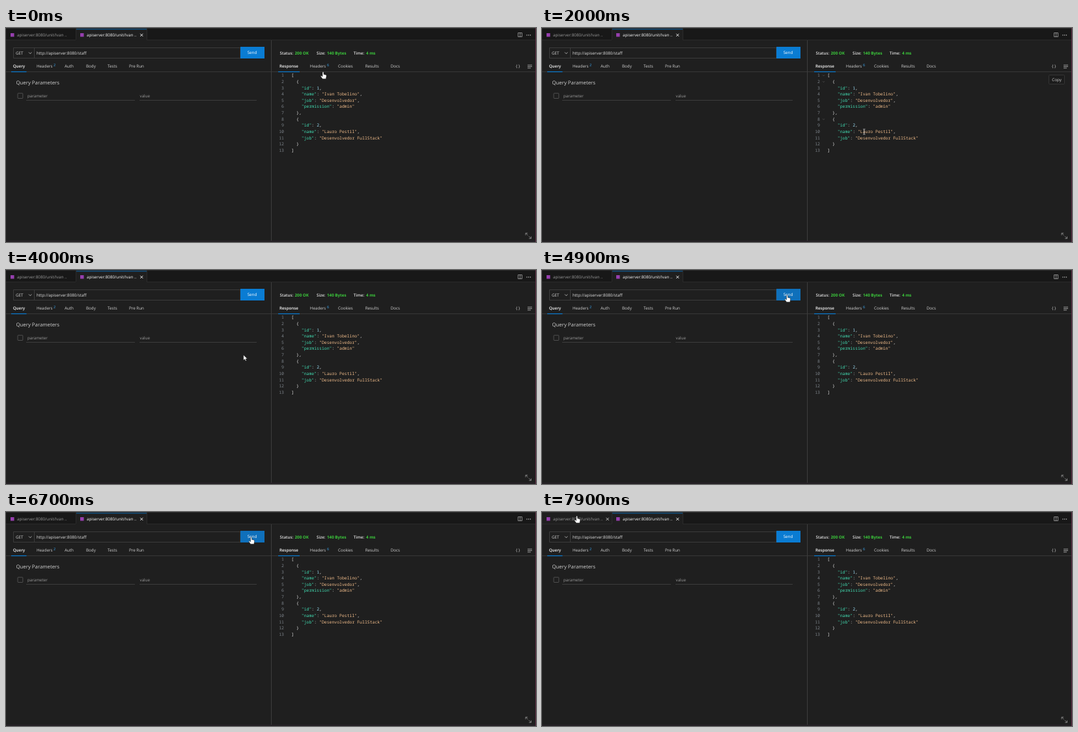
Animation, 814 px wide and 330 px high, one loop 8000 ms. Source, as an HTML page:

```html
<!DOCTYPE html>
<html lang="en">
<head>
<meta charset="utf-8">
<title>API client</title>
<style>
  html, body { margin: 0; width: 100%; height: 100%; overflow: hidden; background: #1f1f1f; }
  svg { display: block; width: 100vw; height: 100vh; }
  text { font: 500 6.25px "Open Sans", "Noto Sans", sans-serif; text-rendering: geometricPrecision; white-space: pre; }
  .code { font: 500 6.48px "Noto Sans Mono", "DejaVu Sans Mono", monospace; }
  .bold { font-weight: 600; }
  .heavy { font-weight: 700; }
  .sup { font-size: 5.5px; }
  .title { font-size: 7.8px; font-weight: 400; }
</style>
</head>
<body>
<svg id="stage" viewBox="0 0 814 330"></svg>
<script>
const LOOP = 8000, STEP = 100;
const C = {
  bg: '#1f1f1f', bar: '#181818', edge: '#2b2b2b', rule: '#444', text: '#d2d2d2', dim: '#9a9a9a',
  white: '#fafafa', blue: '#0a7cd3', hover: '#0f70bb', sky: '#3aa8f4', green: '#3ccb3c',
  key: '#42dcb2', str: '#f0bc8a', num: '#9bdcf5', line: '#7d838a', badge: '#963fae'
};

const rect = (x, y, w, h, fill, extra = '') =>
  `<rect x="${x}" y="${y}" width="${w}" height="${h}" fill="${fill}" ${extra}/>`;
const path = (d, stroke, w = 1, extra = '') =>
  `<path d="${d}" fill="none" stroke="${stroke}" stroke-width="${w}" ${extra}/>`;
const label = (x, y, s, fill = C.text, cls = '', extra = '') =>
  `<text x="${x}" y="${y}" fill="${fill}" class="${cls}" ${extra}>${s}</text>`;
const cross = (x, color, id = '') =>
  path(`M${x - 2} 8.8l4.2 4.2m0-4.2l-4.2 4.2`, color, 0.9, id);

function frame() {
  const tab = 'apiserver:8080/unit/Ivan ..';
  return rect(0, 0, 814, 330, C.bg) +
    rect(0, 0, 814, 19, C.bar) + path('M0 .5H814M0 18.5H814', C.edge) +
    rect(0, 1, 107, 17, C.bg, 'id="tabHover"') +
    rect(107, 1, 109, 18, C.bg) + rect(107, 1.4, 109, 1, '#0c66aa') +
    path('M107.5 1V18M216.5 1V18', C.edge) +
    rect(7, 8, 5.5, 5.5, C.badge) + rect(114, 8, 5.5, 5.5, C.badge) +
    label(17, 13.2, tab, C.dim) + label(124, 13.2, tab, C.white) +
    cross(100.5, C.text, 'id="tabClose"') + cross(208.2, C.white) +
    path('M786.5 7.5h6v6h-6zM789.5 7.5v6', '#b8b8b8', 0.7) +
    [800, 802.7, 805.4].map(x => `<circle cx="${x}" cy="11" r=".7" fill="${C.text}"/>`).join('') +
    path('M407.5 19V328', '#3d3d3d') + path('M0 67.5H407M408 67.5H813', '#383838') +
    path('M0 328.5H814', '#2b222b') + path('M813.5 0V330', '#5f2d45');
}

function request() {
  const tabs = [['Headers', 47], ['Auth', 90], ['Body', 123], ['Tests', 156], ['Pre Run', 189]];
  return path('M11.5 30.5H360V46.5H11.5zM43.5 30.5V46.5', '#3c3c3c') +
    label(15, 40.8, 'GET') + path('M35 37.5l2.2 2.2 2.2-2.2', C.text, 0.8) +
    label(47, 40.5, 'http://apiserver:8080/staff', '#e4e4e4') +
    rect(360, 29, 37, 18, C.blue, 'id="send"') +
    label(378, 40.4, 'Send', '#fff', '', 'text-anchor="middle"') +
    label(10.7, 61.4, 'Query', C.white, 'bold') + rect(8, 66.9, 23.5, 1.2, C.blue) +
    tabs.map(([s, x]) => label(x, 61.4, s)).join('') +
    label(73, 59.4, '2', C.sky, 'sup') +
    label(15.5, 86.8, 'Query Parameters', C.text, 'title') +
    rect(18, 100.7, 7.8, 7.8, 'none', `rx=".8" stroke="#5c5c5c" stroke-width=".8"`) +
    label(33, 106.7, 'parameter', C.dim) + label(205.5, 106.7, 'value', C.dim) +
    path('M31 111.5H198M205 111.5H385', C.rule, 0.8);
}

function json() {
  const span = (s, fill) => `<tspan fill="${fill}">${s}</tspan>`;
  const pair = (key, value, end = ',') => '    ' + span(`"${key}"`, C.key) + ': ' +
    (typeof value === 'number' ? span(value, C.num) : span(`"${value}"`, C.str)) + end;
  const lines = [
    '[', '  {', pair('id', 1), pair('name', 'Ivan Tobelino'), pair('job', 'Desenvolvedor'),
    pair('permission', 'admin', ''), '  },', '  {', pair('id', 2), pair('name', 'Lauro Pestil'),
    pair('job', 'Desenvolvedor FullStack', ''), '  }', ']'
  ];
  const lineY = i => 73 + 9.625 * i;
  const folds = [0, 1, 7].map(i => `M431 ${lineY(i) - 0.5}l1.5 1.5 1.5-1.5`).join('');
  return lines.map((s, i) =>
    label(427, lineY(i) + 2.3, i + 1, C.line, 'code', 'text-anchor="end"') +
    label(438.3, lineY(i) + 2.3, s, '#e2e2e2', 'code')).join('') +
    path(folds, '#8a8a8a', 0.6, 'id="folds"');
}

function response() {
  const stats = [['Status:', 420.5, '200 OK', 443.5], ['Size:', 477, '140 Bytes', 493], ['Time:', 533.7, '4 ms', 553]];
  const tabs = [['Headers', 466.8], ['Cookies', 510], ['Results', 551.7], ['Docs', 590.7]];
  return stats.map(([a, ax, b, bx]) =>
    label(ax, 40.9, a, '#e4e4e4', 'bold') + label(bx, 40.9, b, C.green, 'heavy')).join('') +
    label(420, 61.4, 'Response', C.white, 'bold') + rect(418, 66.9, 33, 1.2, C.blue) +
    tabs.map(([s, x]) => label(x, 61.4, s)).join('') +
    label(493, 59.4, '6', C.sky, 'sup') +
    label(783, 61.3, '{ }', C.text) +
    path('M801 57.2h7M801 59.5h7M801 61.8h5', C.text, 0.7) +
    json() +
    `<g id="copy">${rect(778.5, 72.5, 24, 14, '#1c1c1c', 'rx="1" stroke="#3c3c3c" stroke-width=".8"')}
      ${label(790.6, 81.7, 'Copy', C.text, '', 'text-anchor="middle"')}</g>` +
    path('M798 319.5v-3.2h3.2M798.3 316.5l3.2 3.2M806.5 321.5v3.2h-3.2M806.2 324.4l-3.2-3.2', C.dim, 0.8);
}

// Each cursor is drawn around its hot spot at 0,0.
const cursors = `
  <path id="arrow" d="M0 0V8.2L1.9 6.5 3.2 9.3 4.6 8.7 3.4 5.9H6z" fill="#fff" stroke="#111" stroke-width=".5"/>
  <path id="hand" d="M-1 1.4Q0-.2 1 1.4V4.4L4.3 5.2Q5.4 5.6 5.2 7L4.4 11.4H-.8L-3.6 7.8Q-4 6.6-2.7 6.6L-1 7.8z"
    fill="#fff" stroke="#111" stroke-width=".5"/>
  <path id="beam" d="M-1.6-4H-.5L0-3.6.5-4H1.6M0-3.6V3.6M-1.6 4H-.5L0 3.6.5 4H1.6" fill="none" stroke="#e4e4e4" stroke-width=".8"/>`;

const stage = document.getElementById('stage');
stage.innerHTML = frame() + request() + response() + `<g id="cursor">${cursors}</g>`;
const el = id => document.getElementById(id);
const show = (id, on) => el(id).setAttribute('visibility', on ? 'visible' : 'hidden');

// time, x, y
const route = [
  [0, 487, 67], [400, 489, 120], [900, 486, 193], [1200, 485.7, 203], [1500, 484, 198],
  [1800, 488, 180], [2300, 505, 130], [2700, 513, 107], [2900, 508, 140], [3200, 480, 225],
  [3600, 440, 143], [3800, 396, 141], [4000, 364.7, 131], [4200, 338, 100], [4400, 368, 48],
  [4500, 376.5, 38], [6800, 376.5, 38], [7100, 325, 49], [7400, 190, 28],
  [7700, 87, 4], [7900, 53.5, 5.5], [8000, 53.5, 5.5]
];

function position(t) {
  const i = route.findIndex(p => p[0] > t);
  const [t0, x0, y0] = route[i - 1], [t1, x1, y1] = route[i];
  const k = (t - t0) / (t1 - t0);
  return [x0 + (x1 - x0) * k, y0 + (y1 - y0) * k];
}

function draw(t) {
  const [x, y] = position(t);
  const within = (x0, y0, x1, y1) => x >= x0 && x < x1 && y >= y0 && y < y1;
  const onCode = within(408, 68, 814, 328);
  const onSend = within(360, 29, 397, 47);
  const onTab = within(0, 0, 107, 19);
  const onHand = onSend || within(0, 0, 217, 19) || within(418, 52, 610, 68);
  const kind = onHand ? 'hand' : onCode || within(43, 30, 360, 47) ? 'beam' : 'arrow';
  for (const id of ['arrow', 'hand', 'beam']) show(id, id === kind);
  el('cursor').setAttribute('transform', `translate(${x} ${y})`);
  el('send').setAttribute('fill', onSend ? C.hover : C.blue);
  show('tabHover', onTab);
  show('tabClose', onTab);
  show('copy', onCode);
  const fold = t < 900 ? 0 : Math.max(0, Math.min(1, (2300 - t) / 500));
  el('folds').setAttribute('opacity', fold);
}

const start = performance.now();
function tick() {
  const t = (performance.now() - start) % LOOP;
  draw(Math.floor(t / STEP) * STEP);
  requestAnimationFrame(tick);
}
tick();
</script>
</body>
</html>
```
